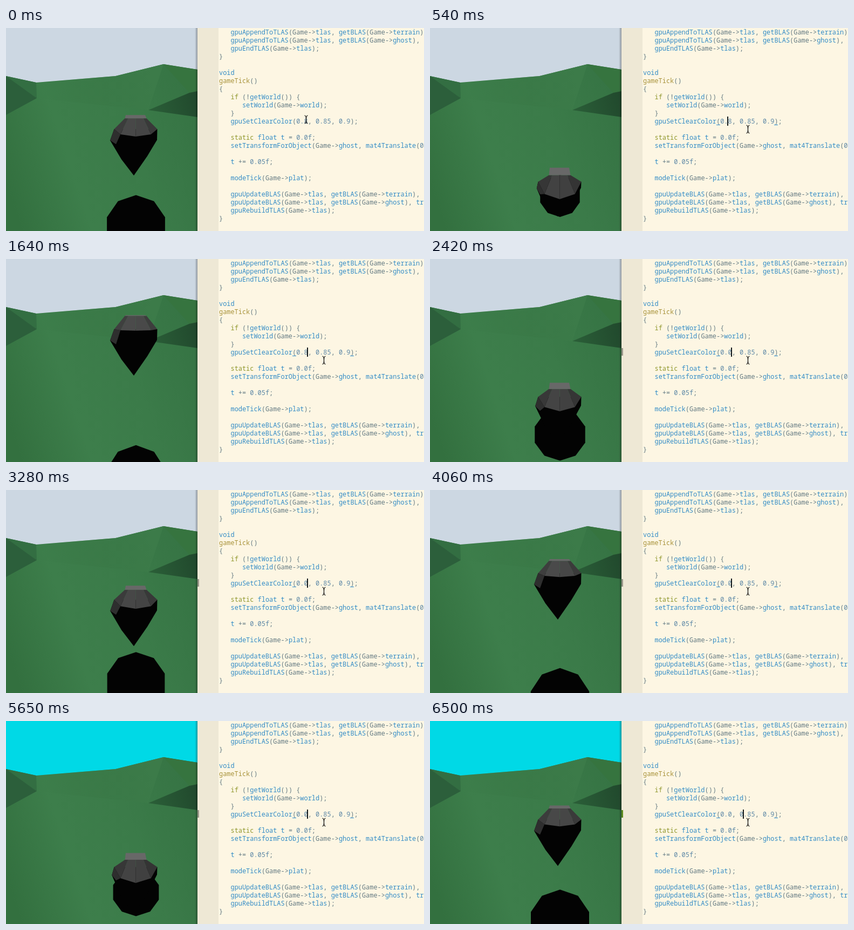
These frames come from a looping animation (775 by 376 pixels, 6.58 s). An HTML page with a canvas:

```html
<!DOCTYPE html>
<html lang="en">
<head>
<meta charset="utf-8">
<style>
html, body { margin: 0; width: 775px; height: 376px; overflow: hidden; background: #fdf6e3; }
canvas { display: block; }
</style>
</head>
<body>
<canvas id="stage" width="775" height="376"></canvas>
<script>
const ctx = document.getElementById('stage').getContext('2d');
const LOOP = 6580, STEP = LOOP / 84, PERIOD = 2120;
const CLICK = 220, ERASE = 2030, TYPE = 2340, RELOAD = 4290, MARK = 6100;
const CHAR = 7.16, LEFT = 395, LINE = 15;
const { PI, sin, cos, min, max, floor, abs } = Math;

const code = value => `   gpuAppendToTLAS(Game->tlas, getBLAS(Game->terrain), transform);
   gpuAppendToTLAS(Game->tlas, getBLAS(Game->ghost), transform);
   gpuEndTLAS(Game->tlas);
}

void
gameTick()
{
   if (!getWorld()) {
      setWorld(Game->world);
   }
   gpuSetClearColor(${value}, 0.85, 0.9);

   static float t = 0.0f;
   setTransformForObject(Game->ghost, mat4Translate(0.0f, t));

   t += 0.05f;

   modeTick(Game->plat);

   gpuUpdateBLAS(Game->tlas, getBLAS(Game->terrain), transform);
   gpuUpdateBLAS(Game->tlas, getBLAS(Game->ghost), transform);
   gpuRebuildTLAS(Game->tlas);
}`.split('\n');

// A list of n items made by f(i).
const list = (n, f) => Array.from({ length: n }, (_, i) => f(i));

function rect(x, y, w, h, fill) {
  ctx.fillStyle = fill;
  ctx.fillRect(x, y, w, h);
}

function poly(points, fill) {
  ctx.beginPath();
  points.forEach(p => ctx.lineTo(...p));
  ctx.closePath();
  ctx.fillStyle = fill;
  ctx.fill();
}

function gradient(x0, y0, x1, y1, ...colors) {
  const g = ctx.createLinearGradient(x0, y0, x1, y1);
  colors.forEach((c, i) => g.addColorStop(i / (colors.length - 1), c));
  return g;
}

function drawTerrain(sky) {
  rect(0, 0, 355, 376, sky);
  const west = [0, 89], dip = [56, 101], bend = [203, 89], peak = [292, 67], east = [355, 77];
  const knoll = [57, 130], hollow = [264, 152];
  poly([west, dip, bend, peak, east, [355, 376], [0, 376]],
    gradient(0, 290, 355, 170, '#33703f', '#3d7e4b', '#3b7b49', '#367444'));
  poly([dip, bend, peak, hollow, knoll], gradient(60, 130, 270, 90, '#36754300', '#3c7b49'));
  poly([peak, east, [355, 118], [340, 120]], '#36743f');
  poly([west, dip, knoll], '#336e42');
  poly([west, knoll, [0, 161]], '#2c5f3b');
  poly([[340, 120], [355, 117], [355, 165], hollow], gradient(264, 150, 355, 130, '#2b5f38', '#21492d'));
}

function drawGhost(y) {
  const drop = y - 105, sink = (drop / 155) ** 4;

  // Shadow: a regular decagon that shrinks as the ghost sinks into the hill.
  const top = 344 - .62 * drop + 24 * sink, bottom = 473 - .8 * drop;
  const half = 57 - 19 * sink, middle = (top + bottom) / 2;
  poly(list(10, i => [
    241 + half * sin(i * PI / 5),
    middle - (bottom - top) / 2 * cos(i * PI / 5)
  ]), '#030303');

  // Gem: a flat cap, a ring of facets and a black cone.
  const cap = 1.5 + .08 * drop, depth = 3 + .19 * drop;
  const ring = (r, level, tilt) => list(5, i => [
    240.5 + r * cos(i * PI / 4),
    y + level + tilt * sin(i * PI / 4)
  ]);
  const rim = ring(20, cap, 0), shoulder = ring(40, 26, depth);
  const tip = min(112, bottom - y - 1), side = min(82, tip - 14);
  const elbow = [193 + 5 * sink, y + 47 - 9 * sink];
  poly([shoulder[0], [280, y + 46 - 9 * sink], [262, y + side - 6], [237, y + tip],
    [214, y + side], elbow, shoulder[4]], '#030303');

  const gray = v => `rgb(${v},${v},${v})`;
  poly([elbow, shoulder[4], shoulder[3], [204, y + 54 - 5 * sink]], gray(46));
  for (let i = 0; i < 4; i++) {
    poly([rim[i], rim[i + 1], shoulder[i + 1], shoulder[i]],
      gray(80 - 12 * abs(i - 1.6) - .06 * drop));
  }
  poly([[222, y], [258, y], rim[0], rim[4]], gray(104));
}

function tokenColor(word) {
  if (word === 'if' || word === 'static') return '#8f962b';
  if (word === 'gameTick') return '#a8923a';
  if (/^\d/.test(word)) return '#5c87a6';
  return word === 'Game' || /^\W/.test(word) ? '#657b83' : '#338cc6';
}

function drawCode(value, clicked) {
  rect(355, 0, 39, 376, '#eee8d5');
  rect(394, 0, 381, 376, '#fdf6e3');
  ctx.font = '11.93px "Noto Sans Mono", "DejaVu Sans Mono", monospace';
  code(value).forEach((line, row) => {
    for (const m of line.matchAll(/[A-Za-z_]\w*|\d[\w.]*|\S/g)) {
      ctx.fillStyle = tokenColor(m[0]);
      ctx.fillText(m[0], LEFT + m.index * CHAR, 12 + row * LINE);
    }
  });
  if (clicked) {
    for (const col of [19, 31 + value.length]) rect(floor(LEFT + col * CHAR), 179, 7, 1, '#268bd2');
  }
}

function drawCaret(t) {
  const steps = [1080, TYPE, 5950, MARK, 6250].filter(key => key <= t).length;
  const col = 22 + steps - (t >= ERASE);
  const faint = t > 4600 && t < 5100;
  rect(floor(LEFT + col * CHAR) - 1, 164, faint ? 1 : 2, 17, faint ? '#a9a9a0' : '#141a1c');
}

function drawPointer(x, y) {
  ctx.strokeStyle = '#111';
  ctx.lineWidth = 1.2;
  ctx.beginPath();
  for (const s of [-1, 1]) {
    ctx.moveTo(x - 3, y + 7.5 * s);
    ctx.quadraticCurveTo(x, y + 7.5 * s, x, y);
    ctx.quadraticCurveTo(x, y + 7.5 * s, x + 3, y + 7.5 * s);
  }
  ctx.stroke();
}

function draw(t) {
  const reloaded = t >= RELOAD, clicked = t >= CLICK;
  const peak = reloaded ? 4800 : 1680;
  drawTerrain(reloaded ? '#00d9e6' : '#ccd7e2');
  drawGhost(182 - 78.5 * cos((t - peak) / PERIOD * 2 * PI));
  rect(350, 0, 5, 376, gradient(350, 0, 355, 0, 'rgba(0,0,0,0)', 'rgba(0,0,0,.3)'));

  drawCode(t < ERASE ? '0.8' : t < TYPE ? '0.' : '0.0', clicked);
  if (t >= ERASE) rect(355, 165, 3, 14, t >= MARK ? '#5c8a1e' : '#99968a');
  if (clicked) drawCaret(t);
  const k = min(1, max(0, (t - 250) / 220)), ease = k * k * (3 - 2 * k);
  drawPointer(556.5 + 33 * ease, 169.5 + 18 * ease);
}

const start = performance.now();
function tick() {
  const t = (performance.now() - start) % LOOP;
  draw(floor((t + 15) / STEP) % 84 * STEP);
  requestAnimationFrame(tick);
}
tick();
</script>
</body>
</html>
```
